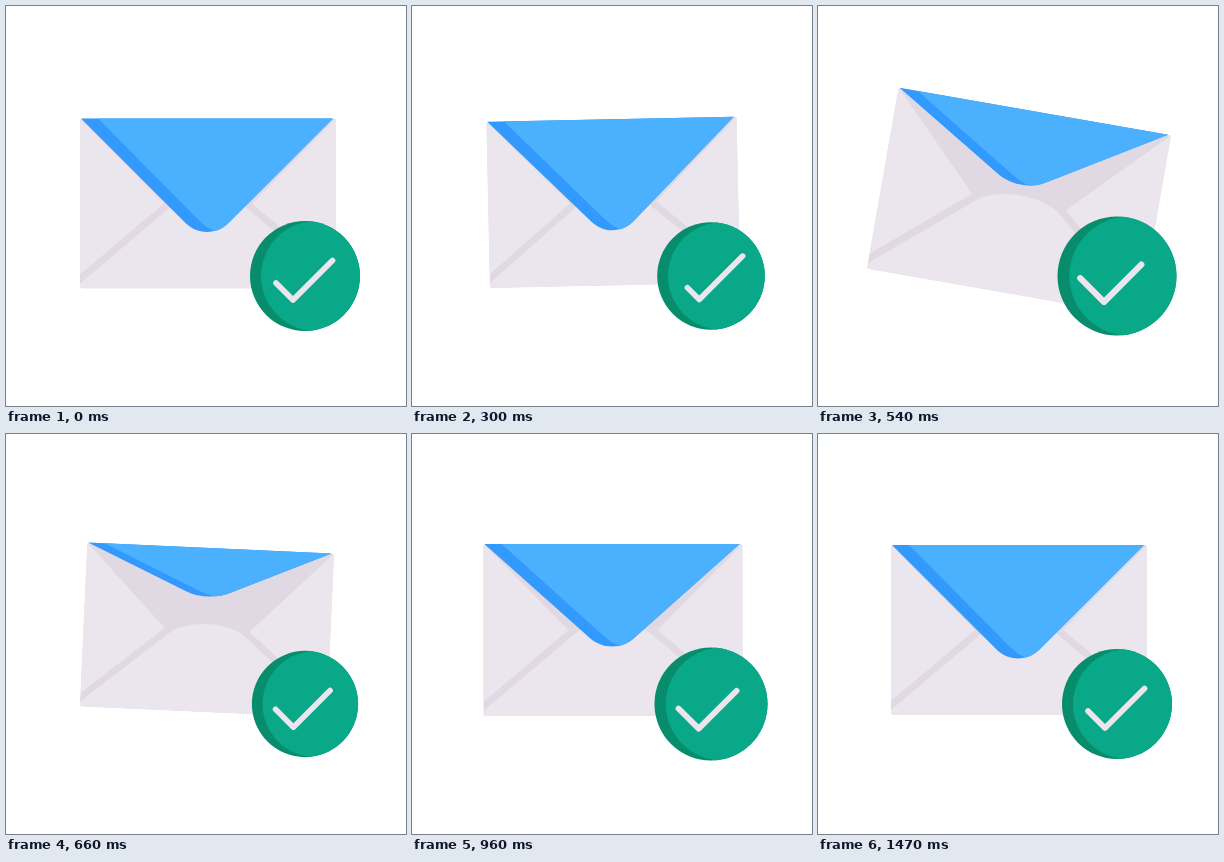
Animation, 400 px wide and 400 px high, one loop 1.59 s. Source, as an HTML page with a canvas:

```html
<!DOCTYPE html>
<html lang="en">
<head>
<meta charset="utf-8">
<title>Message sent</title>
<style>
  html, body { margin: 0; width: 100%; height: 100%; overflow: hidden; background: #fff; }
  canvas { display: block; width: 400px; height: 400px; }
</style>
</head>
<body>
<canvas id="stage" width="400" height="400"></canvas>
<script>
const ctx = document.getElementById('stage').getContext('2d');
const LOOP = 1590, STEP = 30, LAST = 1470, TAU = Math.PI * 2;
const PAPER = '#ebe6ed', SHADE = '#e0d9e3';
const BLUE = '#4bb0fd', DEEP_BLUE = '#3299fd';
const GREEN = '#08a888', DEEP_GREEN = '#078d6c';

const progress = (t, from, to) => Math.min(1, Math.max(0, (t - from) / (to - from)));

// Eased ramp from 0 to 1.
const glide = (t, from, to) => (1 - Math.cos(Math.PI * progress(t, from, to))) / 2;

// Shrink, swell, then a damped wobble that is faded out by 1080 ms.
function pulse(t, fadeStart) {
  const peak = 500, swell = 0.105;
  if (t < peak) return 1 - 0.09 * glide(t, 0, 165) + (0.09 + swell) * glide(t, 165, peak);
  const age = t - peak;
  const wobble = swell * Math.exp(-0.0027 * age) * Math.cos(Math.PI * age / 240);
  return 1 + wobble * (1 - glide(t, fadeStart, 1080));
}

const tilt = t => -7 * glide(t, 0, 165) + 17.4 * glide(t, 165, 510) - 10.4 * glide(t, 510, 735);

// Opens halfway, falls shut and bounces once.
const flapDepth = t => 1 - 0.56 * glide(t, 300, 680) + 0.54 * glide(t, 680, 1060)
  - 0.09 * glide(t, 1060, 1180) + 0.11 * glide(t, 1180, 1380);

// Length of the short arm of the tick, which sways back and forth.
const checkTail = t => 17 - 5 * glide(t, 0, 280) + 10 * glide(t, 280, 540)
  - 6.3 * glide(t, 540, 1110) + 1.3 * glide(t, 1110, 1350)
  - 2.9 * Math.sin(TAU * progress(t, 540, 1110));

function fill(color, draw) {
  ctx.fillStyle = color;
  ctx.beginPath();
  draw();
  ctx.fill();
}

function drawFlap(depth) {
  ctx.save();
  ctx.translate(0, -85);
  ctx.scale(1, depth);
  fill(DEEP_BLUE, () => {
    ctx.moveTo(-127, 0);
    ctx.lineTo(-24, 103);
    ctx.bezierCurveTo(-11, 117, 9, 117, 22, 103);
    ctx.lineTo(125, 0);
  });
  fill(BLUE, () => {
    ctx.moveTo(-110, 0);
    ctx.lineTo(-9, 102);
    ctx.quadraticCurveTo(-1, 110, 7, 112.6);
    ctx.quadraticCurveTo(15, 110.5, 22, 103);
    ctx.lineTo(125, 0);
  });
  ctx.restore();
}

function drawEnvelope(t) {
  const size = pulse(t, 820), shift = 1 - progress(t, 0, 400);
  ctx.save();
  ctx.translate(201 + shift, 196 + shift * 1.4);
  ctx.rotate(tilt(t) * TAU / 360);
  ctx.scale(size, size);

  ctx.save();
  ctx.beginPath();
  ctx.roundRect(-128, -85, 256, 170, 3);
  ctx.clip();
  fill(SHADE, () => ctx.rect(-128, -85, 256, 170));
  for (const side of [-1, 1]) {
    fill(PAPER, () => {
      ctx.moveTo(128 * side, -85);
      ctx.lineTo(44 * side, 0);
      ctx.lineTo(128 * side, 71);
    });
  }
  fill(PAPER, () => {
    ctx.moveTo(-128, 80);
    ctx.lineTo(-38, 4);
    ctx.bezierCurveTo(-20, -9.5, 20, -9.5, 38, 4);
    ctx.lineTo(128, 80);
    ctx.lineTo(128, 85);
    ctx.lineTo(-128, 85);
  });
  ctx.restore();

  drawFlap(flapDepth(t));
  ctx.restore();
}

function drawBadge(t) {
  const size = pulse(t, 940), tail = checkTail(t), head = 56.5 - tail;
  const radius = 55, rim = 11, meet = Math.acos(rim / 2 / radius);
  ctx.save();
  ctx.translate(299, 270);
  ctx.scale(size, size);
  fill(DEEP_GREEN, () => ctx.arc(0, 0, radius, 0, TAU));
  // The face is the overlap of the disc with a copy moved right by the rim.
  fill(GREEN, () => {
    ctx.arc(0, 0, radius, -meet, meet);
    ctx.arc(rim, 0, radius, Math.PI - meet, Math.PI + meet);
  });

  ctx.strokeStyle = PAPER;
  ctx.lineWidth = 5.7;
  ctx.lineCap = ctx.lineJoin = 'round';
  ctx.beginPath();
  ctx.moveTo(-12 - tail, 24 - tail);
  ctx.lineTo(-12, 24);
  ctx.lineTo(-12 + head, 24 - head);
  ctx.stroke();
  ctx.restore();
}

let start;
function render(now) {
  start ??= now;
  const elapsed = Math.max(0, now - start) % LOOP;
  const t = Math.min(LAST, Math.floor(elapsed / STEP) * STEP);
  ctx.clearRect(0, 0, 400, 400);
  drawEnvelope(t);
  drawBadge(t);
  requestAnimationFrame(render);
}
requestAnimationFrame(render);
</script>
</body>
</html>
```
